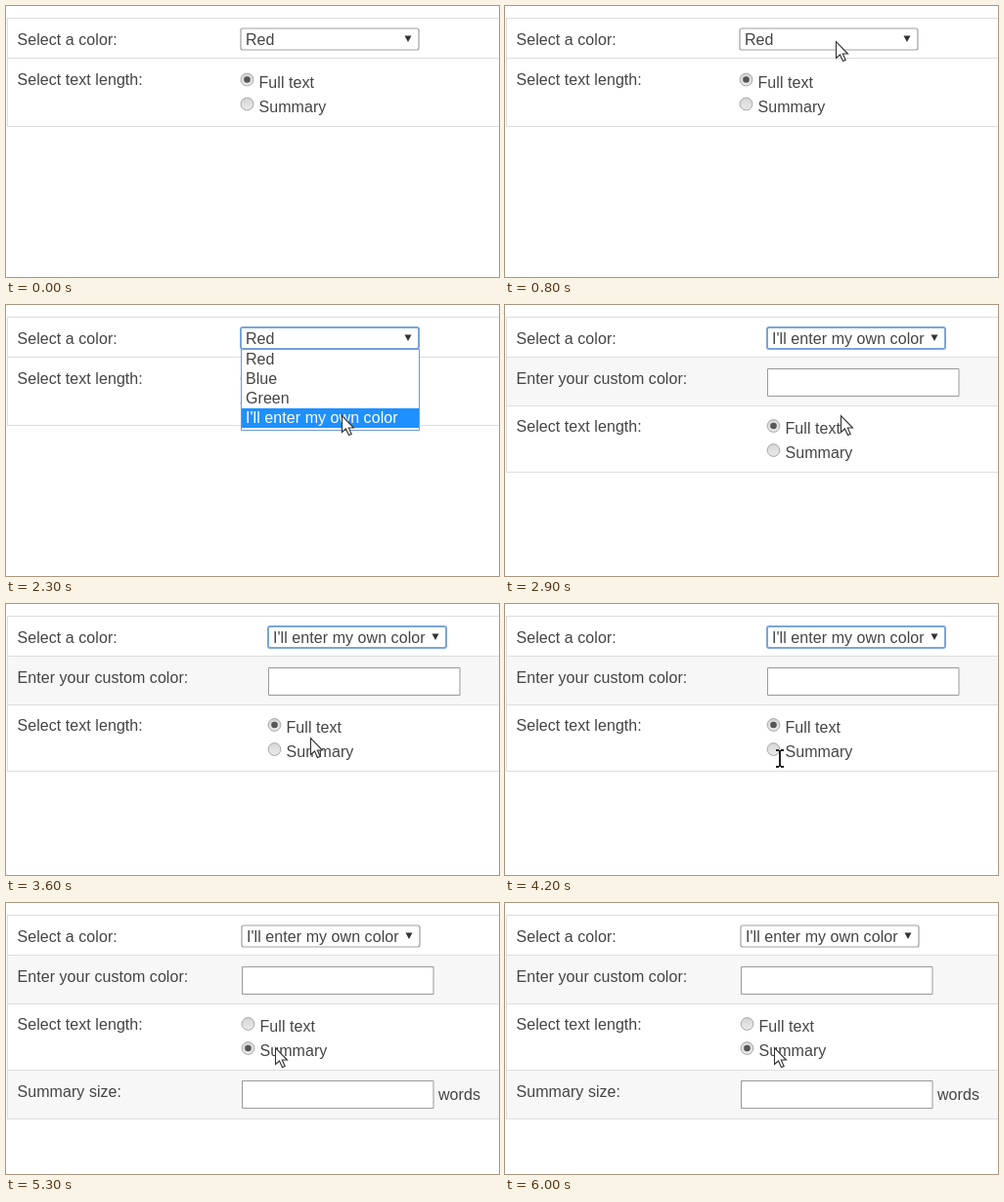
Write an HTML page with a canvas that moves like this. It is 504 px wide and 278 px high and loops after 6100 ms.

```html
<!DOCTYPE html>
<html lang="en">
<head>
<meta charset="utf-8">
<title>Conditional form fields</title>
<style>
  html, body { margin: 0; width: 100%; height: 100%; overflow: hidden; background: #fff; }
  canvas { display: block; width: 504px; height: 278px; }
</style>
</head>
<body>
<canvas id="stage" width="504" height="278"></canvas>
<script>
const ctx = document.getElementById('stage').getContext('2d');
const LOOP = 6100, STEP = 100;
const COLORS = ['Red', 'Blue', 'Green', "I'll enter my own color"];
const OPEN = 1100, CHOSEN = 2700, PRESSED = 4900, SUMMARY = 5200;

// Pointer way points: time, x, y
const PATH = [
  [100, 478, 228], [300, 424, 155], [700, 338, 36], [1100, 338, 36],
  [1500, 341, 88], [1800, 342, 104], [2200, 343, 113], [3100, 343, 113],
  [3700, 304, 142], [4100, 281, 158], [4300, 281, 158], [4600, 275, 148], [LOOP, 275, 148]
];

function pointerAt(t) {
  if (t < PATH[0][0]) return null;
  const i = PATH.findIndex(p => p[0] > t);
  const [t0, x0, y0] = PATH[i - 1], [t1, x1, y1] = PATH[i];
  const k = (t - t0) / (t1 - t0);
  return { x: Math.round(x0 + (x1 - x0) * k), y: Math.round(y0 + (y1 - y0) * k) };
}

function text(s, x, baseline, color = '#444') {
  ctx.fillStyle = color;
  ctx.fillText(s, x, baseline);
}

function box(x, y, w, h, border, fill, radius = 0, line = 1) {
  ctx.beginPath();
  ctx.roundRect(x + .5, y + .5, w - 1, h - 1, radius);
  ctx.fillStyle = fill;
  ctx.fill();
  ctx.strokeStyle = border;
  ctx.lineWidth = line;
  ctx.stroke();
}

function row(top, bottom, shaded) {
  ctx.fillStyle = shaded ? '#f7f7f7' : '#fff';
  ctx.fillRect(1, top, 503, bottom - top);
  ctx.fillStyle = '#ddd';
  ctx.fillRect(1, top, 503, 1);
  ctx.fillRect(1, bottom, 503, 1);
  ctx.fillRect(1, top, 1, bottom - top);
}

function select(x, value, focused) {
  box(x - .5, 22.5, 183, 23, focused ? '#7aa5d8' : '#a0a0a0', '#fff', 2, focused ? 2 : 1.2);
  text(value, x + 5, 40);
  ctx.fillStyle = '#333';
  ctx.beginPath();
  ctx.moveTo(x + 167.5, 30.5);
  ctx.lineTo(x + 174.5, 30.5);
  ctx.lineTo(x + 171, 37);
  ctx.fill();
}

function radio(label, x, y, checked, pressed) {
  const shade = ctx.createLinearGradient(0, y - 6, 0, y + 6);
  shade.addColorStop(0, pressed ? '#c0c0c0' : '#d6d6d6');
  shade.addColorStop(1, pressed ? '#d4d4d4' : '#eaeaea');
  ctx.beginPath();
  ctx.arc(x, y, 6.4, 0, 7);
  ctx.fillStyle = shade;
  ctx.fill();
  ctx.strokeStyle = '#a8a8a8';
  ctx.lineWidth = 1;
  ctx.stroke();
  if (checked) {
    ctx.beginPath();
    ctx.arc(x, y, 3.3, 0, 7);
    ctx.fillStyle = '#555';
    ctx.fill();
  }
  text(label, x + 12, y + 8);
}

function popup(selected) {
  box(240, 45, 183, 84, '#6b9bd2', '#fff');
  ctx.fillStyle = '#1e90ff';
  ctx.fillRect(241, 46 + 20 * selected, 181, 20);
  COLORS.forEach((name, i) => text(name, 245, 61 + 20 * i, i === selected ? '#fff' : '#444'));
}

function arrow({ x, y }) {
  const outline = [[0, 0], [0, 17], [4, 13.5], [7, 20], [9.7, 19], [6.8, 12.5], [12, 12.5]];
  ctx.beginPath();
  outline.forEach(([dx, dy]) => ctx.lineTo(x + dx + .5, y + dy + .5));
  ctx.closePath();
  ctx.fillStyle = '#fff';
  ctx.fill();
  ctx.strokeStyle = '#333';
  ctx.lineWidth = 1.1;
  ctx.stroke();
}

function textCursor({ x, y }) {
  ctx.fillStyle = '#222';
  ctx.fillRect(x - 1, y - 8, 2, 17);
  for (const dy of [-9, 8]) {
    ctx.fillRect(x - 4, y + dy, 3, 2);
    ctx.fillRect(x + 1, y + dy, 3, 2);
  }
}

function draw(t) {
  const custom = t >= CHOSEN, summary = t >= SUMMARY;
  const left = summary ? 241 : custom ? 268 : 240;
  const shift = custom ? 48.5 : 0;
  const pointer = pointerAt(t);

  ctx.fillStyle = '#fff';
  ctx.fillRect(0, 0, 504, 278);
  ctx.font = '16px "Liberation Sans", Arial, sans-serif';
  ctx.letterSpacing = '0.06px';

  row(12, 53, false);
  if (custom) row(53, 103, true);
  row(custom ? 103 : 53, custom ? 171 : 123, false);
  if (summary) row(171, 221, true);

  text('Select a color:', 11.5, 40);
  select(left, custom ? COLORS[3] : COLORS[0], t >= OPEN && t < PRESSED);
  if (custom) {
    text('Enter your custom color:', 11.5, 81);
    box(left, 65, 196.5, 29, '#999', '#fff');
  }
  text('Select text length:', 11.5, 81 + Math.round(shift));
  radio('Full text', left + 6.5, 75.5 + shift, !summary, false);
  radio('Summary', left + 6.5, 100.5 + shift, summary, t >= PRESSED && !summary);
  if (summary) {
    text('Summary size:', 11.5, 199);
    box(left, 182, 196.5, 29, '#999', '#fff');
    text('words', 442, 202);
  }

  if (t >= OPEN && !custom) {
    const hovered = Math.max(0, Math.min(3, Math.floor((pointer.y - 46) / 20)));
    popup(t <= 1500 ? 0 : hovered);
  }
  if (pointer) (t >= 3700 && t < 4500 ? textCursor : arrow)(pointer);
}

function tick() {
  const t = performance.now() % LOOP;
  draw(Math.floor(t / STEP) * STEP);
  requestAnimationFrame(tick);
}
tick();
</script>
</body>
</html>
```
